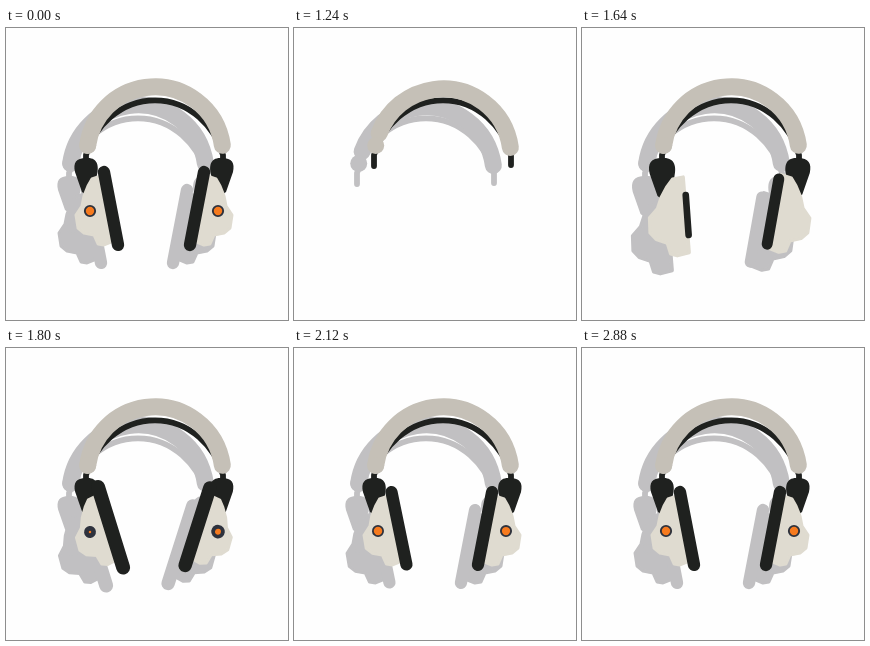
An HTML page with a canvas that plays this animation: 282x292 px, repeating every 4.88 s.

```html
<!DOCTYPE html>
<html lang="en">
<head>
<meta charset="utf-8">
<title>Headphones</title>
<style>
html, body { margin: 0; width: 100%; height: 100%; overflow: hidden; background: #fefefe; }
canvas { display: block; }
</style>
</head>
<body>
<canvas id="stage" width="282" height="292"></canvas>
<script>
const ctx = document.getElementById('stage').getContext('2d');
const LOOP = 4880, STEP = 40, START = 1000, SETTLED = 2880;
const BLACK = '#1f211f', BAND = '#c5c0b7', CUP = '#dfdbd0', RING = '#2e323d', ORANGE = '#f67a1e', SHADOW = '#c1c0c2';

const hoop = new Path2D('M80 138V127C88 99 114 72.3 149 72.3S209 99 217 127V137');
const yoke = new Path2D('M80 130C92 129 93 138 91 147L86 164Q80 168 76 164L69 144C67 135 70 130 80 130Z');
const cup = new Path2D('M95 148L86 151L82 158L78 168L76 178L70 187L72 200L78 205L88 207L92 216L98 217L108 213Z');
const pad = new Path2D('M98 144L112 217');

// Smooth 0 to 1 between two times.
function ramp(t, from, to) {
  const u = Math.min(1, Math.max(0, (t - from) / (to - from)));
  return u * u * (3 - 2 * u);
}

// Springy growth from 0 to 1.
function pop(t, start) {
  const u = Math.max(0, t - start) / 1000;
  return 1 - Math.exp(-9 * u) * Math.cos(13 * u);
}

// Damped pendulum angle in radians.
function swing(t, start) {
  const u = (t - start) / 1000;
  return .84 * Math.exp(-4.5 * u) * Math.cos(6.5 * u);
}

function scoped(draw) {
  ctx.save();
  draw();
  ctx.restore();
}

// Draws scaled about a point, or not at all at size zero.
function grown(x, y, size, draw) {
  if (size > 0) scoped(() => {
    ctx.translate(x, y);
    ctx.scale(size, size);
    ctx.translate(-x, -y);
    draw();
  });
}

function disc(x, y, r, color) {
  ctx.fillStyle = color;
  ctx.beginPath();
  ctx.arc(x, y, r, 0, 7);
  ctx.fill();
}

function fill(path, color) {
  ctx.fillStyle = color;
  ctx.fill(path);
}

function stroke(path, width, color) {
  ctx.lineWidth = width;
  ctx.strokeStyle = color;
  ctx.stroke(path);
}

function headband(t, paint) {
  const hoopPart = ramp(t, 1000, 1200);
  const bandPart = ramp(t, 1040, 1280);
  const drop = 5 * (1 - ramp(t, 1040, 1400));
  scoped(() => {
    ctx.beginPath();
    ctx.rect(230 - 160 * hoopPart, 50, 170, 100);
    ctx.clip();
    stroke(hoop, 5.8, paint(BLACK));
  });
  if (bandPart > 0) {
    const end = -.14, sweep = Math.PI + 2 * end;
    const band = new Path2D();
    band.arc(149, 126.8 + drop, 68, end, end - sweep * bandPart, true);
    stroke(band, 17, paint(BAND));
    disc(81.7, 117.5, 8.5 * ramp(t, 1120, 1240), paint(BAND));
  }
}

// Parts pop out one after another, from the yoke to the dot.
function earpiece(t, paint) {
  grown(80, 130, pop(t, 1360), () => fill(yoke, paint(BLACK)));

  const cupStart = 1405;
  if (t <= cupStart) return;
  ctx.translate(84, 183 + 24 * Math.exp((cupStart - t) / 110));
  ctx.rotate(-0 + swing(t, cupStart));
  ctx.translate(-84, -183);
  grown(84, 183, pop(t, cupStart), () => {
    fill(cup, paint(CUP));
    stroke(cup, 3, paint(CUP));
  });
  grown(105, 180, pop(t, 1540), () => stroke(pad, 12.3, paint(BLACK)));
  disc(84, 183, 6.1 * pop(t, 1640), paint(RING));
  disc(84, 183, 4.2 * pop(t, 1725), paint(ORANGE));
}

function headphones(t, paint) {
  headband(t, paint);
  scoped(() => earpiece(t - 45, paint));
  scoped(() => {
    ctx.translate(296, 0);
    ctx.scale(-1, 1);
    earpiece(t, paint);
  });
}

function render(time) {
  const clock = Math.floor(time % LOOP / STEP) * STEP;
  const t = clock < START ? SETTLED : clock;
  ctx.fillStyle = '#fefefe';
  ctx.fillRect(0, 0, 282, 292);
  ctx.lineCap = ctx.lineJoin = 'round';
  if (t > START) {
    scoped(() => {
      ctx.translate(-17, 18);
      headphones(t, () => SHADOW);
    });
    headphones(t, color => color);
  }
}

const origin = performance.now();
function tick() {
  render(performance.now() - origin);
  requestAnimationFrame(tick);
}
tick();
</script>
</body>
</html>
```
